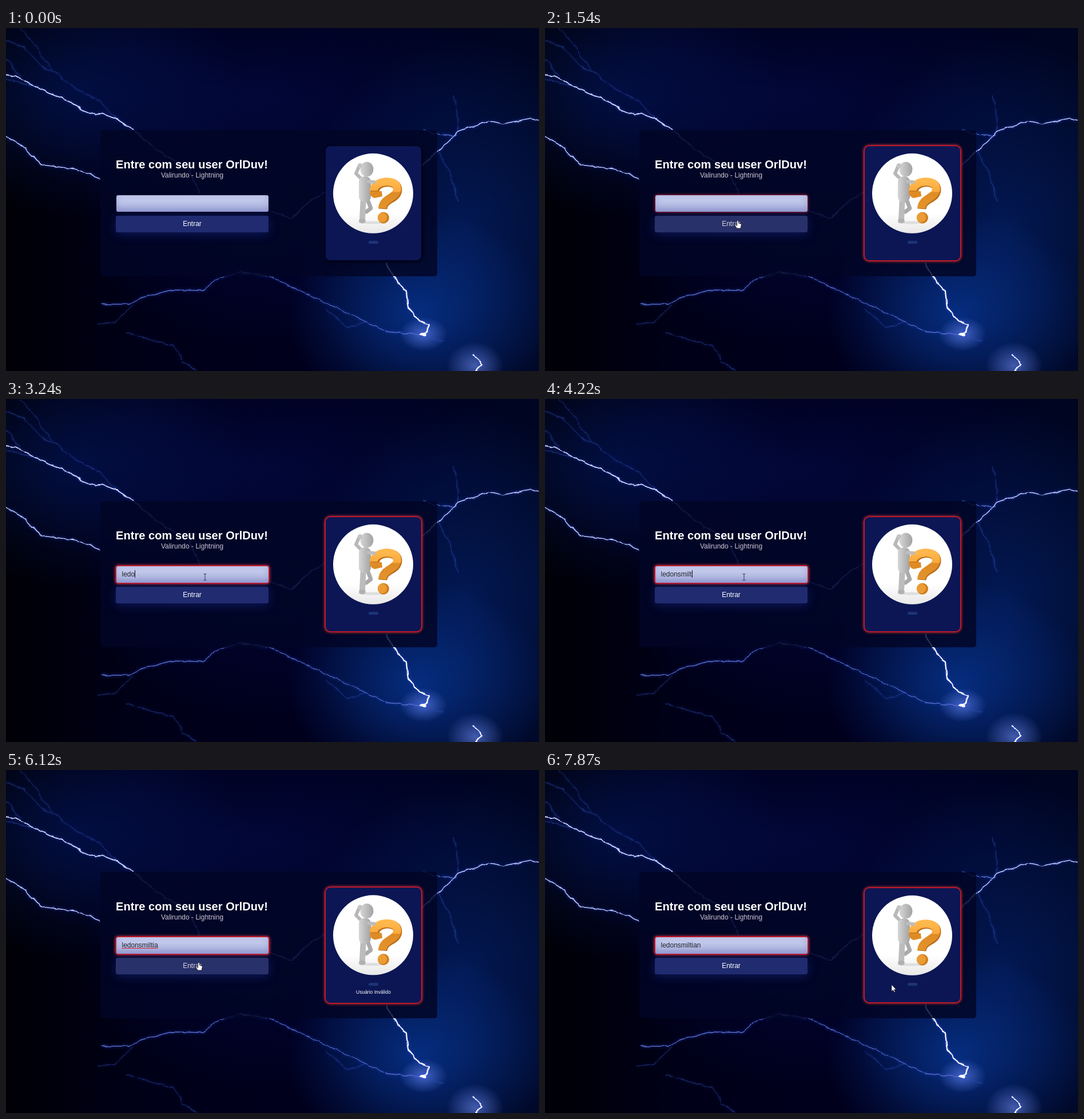
Animation, 932 px wide and 601 px high, one loop 8 s. Source, as an HTML page:

```html
<!DOCTYPE html>
<html lang="pt-BR">
<head>
<meta charset="utf-8">
<style>
  html, body { margin: 0; width: 932px; height: 601px; overflow: hidden; }
  body {
    position: relative;
    font: 12px/14px "Liberation Sans", Arial, sans-serif;
    color: #fff;
    background:
      radial-gradient(50px 42px at 820px 592px, rgba(120,150,255,.55), transparent),
      radial-gradient(42px 30px at 730px 536px, rgba(110,140,255,.6), transparent),
      radial-gradient(230px 180px at 720px 500px, rgba(8,62,165,.65), transparent),
      radial-gradient(290px 330px at 800px 350px, rgba(5,42,125,.55), transparent),
      radial-gradient(300px 220px at 120px 110px, rgba(4,26,100,.5), transparent),
      radial-gradient(540px 190px at 420px 120px, rgba(3,12,75,.55), transparent),
      radial-gradient(300px 240px at 430px 320px, rgba(3,9,70,.5), transparent),
      linear-gradient(90deg, #000006, #000018 25%, #00001e 60%, #000622);
  }
  body > * { position: absolute; box-sizing: border-box; white-space: nowrap; }
  svg { left: 0; top: 0; }
  #panel { left: 165px; width: 588.5px; border-radius: 5px; background: rgba(2,5,37,.82); }
  h1 { left: 192px; top: 227px; width: 266px; margin: 0; font-size: 20.1px; line-height: 24px; display: flex; justify-content: center; }
  #sub { left: 192px; top: 251px; width: 267px; text-align: center; color: #cfc8d6; }
  #field {
    left: 193px; top: 293px; width: 265.5px; height: 28.5px; padding: 7px 9.5px; border-radius: 3px;
    color: #25252f; background: linear-gradient(#c0c7ea 35%, #abb2dc);
  }
  #typed { text-decoration: underline 1px transparent; text-underline-offset: 1px; }
  #caret { display: inline-block; width: 1px; height: 13px; background: #111; vertical-align: -2px; }
  #button {
    left: 192px; top: 329px; width: 267px; height: 29px; padding-top: 7px; border-radius: 3px;
    text-align: center; box-shadow: 0 3px 18px rgba(40,60,190,.38);
  }
  #card { left: 559px; width: 167px; border-radius: 8px; background: #0c1654; }
  #pill { left: 633.5px; top: 373px; width: 17.5px; height: 5px; border-radius: 2px; background: #1c3478; }
  #message { left: 559px; top: 384px; width: 167px; text-align: center; font-size: 8.5px; line-height: 10px; }
</style>
</head>
<body>
<svg width="932" height="601" fill="none" stroke-linejoin="round">
  <filter id="rough" filterUnits="userSpaceOnUse" x="0" y="0" width="932" height="601" color-interpolation-filters="sRGB">
    <feTurbulence type="fractalNoise" baseFrequency=".07" numOctaves="2" seed="4"/>
    <feDisplacementMap in="SourceGraphic" scale="6" xChannelSelector="R" yChannelSelector="G" result="bolt"/>
    <feGaussianBlur stdDeviation="2.5"/>
    <feColorMatrix values="0 0 0 0 .15  0 0 0 0 .28  0 0 0 0 .9  0 0 0 .8 0" result="glow"/>
    <feMerge><feMergeNode in="glow"/><feMergeNode in="bolt"/></feMerge>
  </filter>
  <g filter="url(#rough)">
    <g stroke="#3650ad" stroke-width="1" opacity=".6">
      <path d="M0 22L30 32L62 68L85 78L125 108L165 128L195 162M22 0L50 28L80 74"/>
      <path d="M0 55L25 85M0 90L55 104M783 118L788 140L790 182M755 216L777 255L790 303"/>
      <path d="M210 533L295 558L310 585L332 601M160 520L190 516L222 484"/>
      <path d="M560 492L597 525L630 514M730 538L765 550"/>
    </g>
    <path stroke="#566cc4" stroke-width="1.3" d="M167 484L215 484L235 473L290 459L345 460L365 442L410 428L460 434L500 455L545 475L630 515L665 532L728 538M730 178L750 186L788 188"/>
    <path stroke="#7c8bd0" stroke-width="1.2" d="M222 178L262 212L290 230L318 243L338 290M460 320L500 333L530 305L558 287"/>
    <path stroke="#b9c5fa" stroke-width="1.6" d="M0 190L25 203L45 225L65 240L120 247L165 263M932 162L918 158L870 168L845 163L820 171L790 182L775 198L727 242"/>
    <path stroke="#d8e0ff" stroke-width="1.8" d="M0 82L18 85L60 108L108 127L130 142L157 153L168 149L195 161L222 178"/>
    <path stroke="#fff" stroke-width="2.2" d="M665 410L678 436L700 462L703 490L722 512L740 520L737 533L726 538M817 573L828 583L833 590L822 601"/>
    <ellipse cx="729" cy="537" rx="6" ry="3" fill="#fff"/>
  </g>
</svg>

<div id="panel"></div>
<h1>Entre com seu user OrlDuv!</h1>
<div id="sub">Valirundo - Lightning</div>
<div id="field"><span id="typed"></span><span id="caret"></span></div>
<div id="button">Entrar</div>
<div id="card"></div>

<svg width="932" height="601" fill="none" stroke-linecap="round" stroke-linejoin="round">
  <defs>
    <linearGradient id="floor" x2="0" y2="1"><stop offset=".75" stop-color="#fff"/><stop offset="1" stop-color="#e8e8e8"/></linearGradient>
    <linearGradient id="grey"><stop stop-color="#d6d6d6"/><stop offset="1" stop-color="#a2a2a2"/></linearGradient>
    <linearGradient id="amber" x2="0" y2="1"><stop stop-color="#ffb84d"/><stop offset=".38" stop-color="#f9a83c"/><stop offset=".4" stop-color="#df8b25"/><stop offset="1" stop-color="#e3932d"/></linearGradient>
  </defs>
  <g id="avatar">
    <circle cx="642" cy="289.800" r="70" fill="url(#floor)"/>
    <ellipse cx="640" cy="341" rx="24" ry="2.500" fill="#dedede"/>
    <path d="M632 300L638 316L630 322" stroke="#aaa" stroke-width="7"/>
    <path d="M625 298L623 335" stroke="#bcbcbc" stroke-width="10"/>
    <ellipse cx="623" cy="338" rx="6" ry="4" fill="#b0b0b0"/>
    <path d="M621 264L612 255L618 241" stroke="#b8b8b8" stroke-width="6"/>
    <rect x="617" y="260" width="21" height="45" rx="9" fill="url(#grey)"/>
    <ellipse cx="631" cy="247.500" rx="11.500" ry="13" fill="url(#grey)"/>
    <circle cx="619" cy="241" r="4" fill="#c4c4c4"/>
    <path d="M645 287C645 267 686 264 685 284C684 301 660 298 659 317" stroke="#b96c16" stroke-width="15" stroke-linecap="butt"/>
    <path d="M643 285C643 266 685 263 684 282C683 299 659 297 658 316" stroke="url(#amber)" stroke-width="14" stroke-linecap="butt"/>
    <path d="M636 286L657 286L658 295L645 298Q636 296 636 286Z" fill="#df8b25"/>
    <circle cx="660" cy="332.500" r="10" fill="#cf7e1d"/>
    <ellipse cx="658" cy="332" rx="8" ry="8.500" fill="#eb9c34"/>
    <path d="M634 269L644 270" stroke="#bdbdbd" stroke-width="6"/>
  </g>
</svg>
<div id="pill"></div>
<div id="message">Usuário Inválido</div>

<svg width="932" height="601" fill="none">
  <g id="cursor">
    <path id="arrow" d="M0 0V12L2.800 9.500L4.600 13.500L6.300 12.700L4.600 8.800H8Z" fill="#fff" stroke="#111" stroke-width=".7"/>
    <path id="beam" d="M-2.500 -5.500H-.8L0 -5L.8 -5.500H2.500M0 -5V5M-2.500 5.500H-.8L0 5L.8 5.500H2.500" stroke="#333b50"/>
    <path id="hand" d="M-1.300 0Q0 -1.500 1.300 0V4L5.500 5.200Q6.500 5.600 6.300 7L5 13H-1.500L-4.500 8.500Q-5 6.500 -3.300 7L-1.300 8.500Z" fill="#fff" stroke="#111" stroke-width=".7"/>
  </g>
</svg>

<script>
const LOOP = 8000;
const $ = id => document.getElementById(id);
const between = (t, a, b) => t >= a && t < b;
const ramp = (t, a, b) => Math.min(1, Math.max(0, (t - a) / (b - a)));
const inside = (x, y, left, top, right, bottom) => between(x, left, right) && between(y, top, bottom);

const name = "ledonsmiltian";
const keyTimes = [2780, 2910, 3040, 3240, 3370, 3570, 3770, 3900, 4100, 4220, 4420, 4820, 7340];
const focusTimes = [2030, 7010];

// time, x, y
const route = [
  [260, 876, 590], [500, 640, 400], [730, 380, 268], [930, 326, 306], [1070, 326, 307],
  [1330, 337, 338], [1860, 337, 338], [2170, 348, 312], [5440, 348, 312], [5700, 337, 338],
  [6190, 337, 338], [6500, 325, 316], [6800, 313, 305], [7340, 313, 305], [7870, 606, 376]
];

function pointer(t) {
  const next = route.findIndex(p => p[0] > t);
  if (next < 0) return route.at(-1).slice(1);
  if (next === 0) return route[0].slice(1);
  const [t0, x0, y0] = route[next - 1], [t1, x1, y1] = route[next];
  const u = ramp(t, t0, t1), k = u * u * (3 - 2 * u);
  return [x0 + (x1 - x0) * k, y0 + (y1 - y0) * k];
}

function show(id, visible) {
  $(id).style.visibility = visible ? "visible" : "hidden";
}

function place(id, top, height) {
  $(id).style.top = top + "px";
  $(id).style.height = height + "px";
}

function redGlow(amount) {
  return `0 0 0 1.5px rgba(215,22,38,${amount}), 0 0 5px 2px rgba(255,70,80,${amount * .75})`;
}

function draw(t) {
  const [x, y] = pointer(t);
  const overButton = inside(x, y, 192, 329, 459, 358);
  const overField = inside(x, y, 192, 293, 459, 322);
  const overText = overField || inside(x, y, 192, 229, 459, 266);
  const shown = t >= 260;
  $("cursor").setAttribute("transform", `translate(${x} ${y})`);
  show("hand", shown && overButton);
  show("beam", shown && overText);
  show("arrow", shown && !overButton && !overText);

  $("button").style.background = overButton && shown ? "#29316a" : "#202b70";
  $("button").style.color = overButton && shown ? "#d3d3dc" : "#fff";

  const cardError = ramp(t, 1390, 1530), fieldError = ramp(t, 1400, 1800);
  $("card").style.boxShadow = `${redGlow(cardError)}, 2px 2px 5px 1px rgba(0,0,12,.8)`;
  const rim = overField && shown ? .8 : 0;
  $("field").style.boxShadow =
    `inset 0 -6px 12px rgba(70,80,170,.25), ${redGlow(fieldError)}, 0 0 0 1px rgba(75,85,165,${rim})`;

  $("typed").textContent = name.slice(0, keyTimes.filter(k => k <= t).length);
  $("typed").style.textDecorationColor = between(t, 5700, 7340) ? "#e02035" : "transparent";
  const focused = between(t, 2030, 5700) || t >= 7010;
  const lastInput = Math.max(...keyTimes.concat(focusTimes).filter(k => k <= t));
  show("caret", focused && (t - lastInput) % 1000 < 500);

  const invalid = between(t, 6050, 7400);
  show("message", invalid);
  place("panel", invalid ? 178 : 179, invalid ? 257 : 255.5);
  place("card", invalid ? 205.5 : 206.5, invalid ? 202.5 : 200.5);
  $("avatar").setAttribute("transform", `translate(0 ${invalid ? -.5 : 0})`);
}

function tick(now) {
  draw(now % LOOP);
  requestAnimationFrame(tick);
}
draw(0);
requestAnimationFrame(tick);
</script>
</body>
</html>
```
